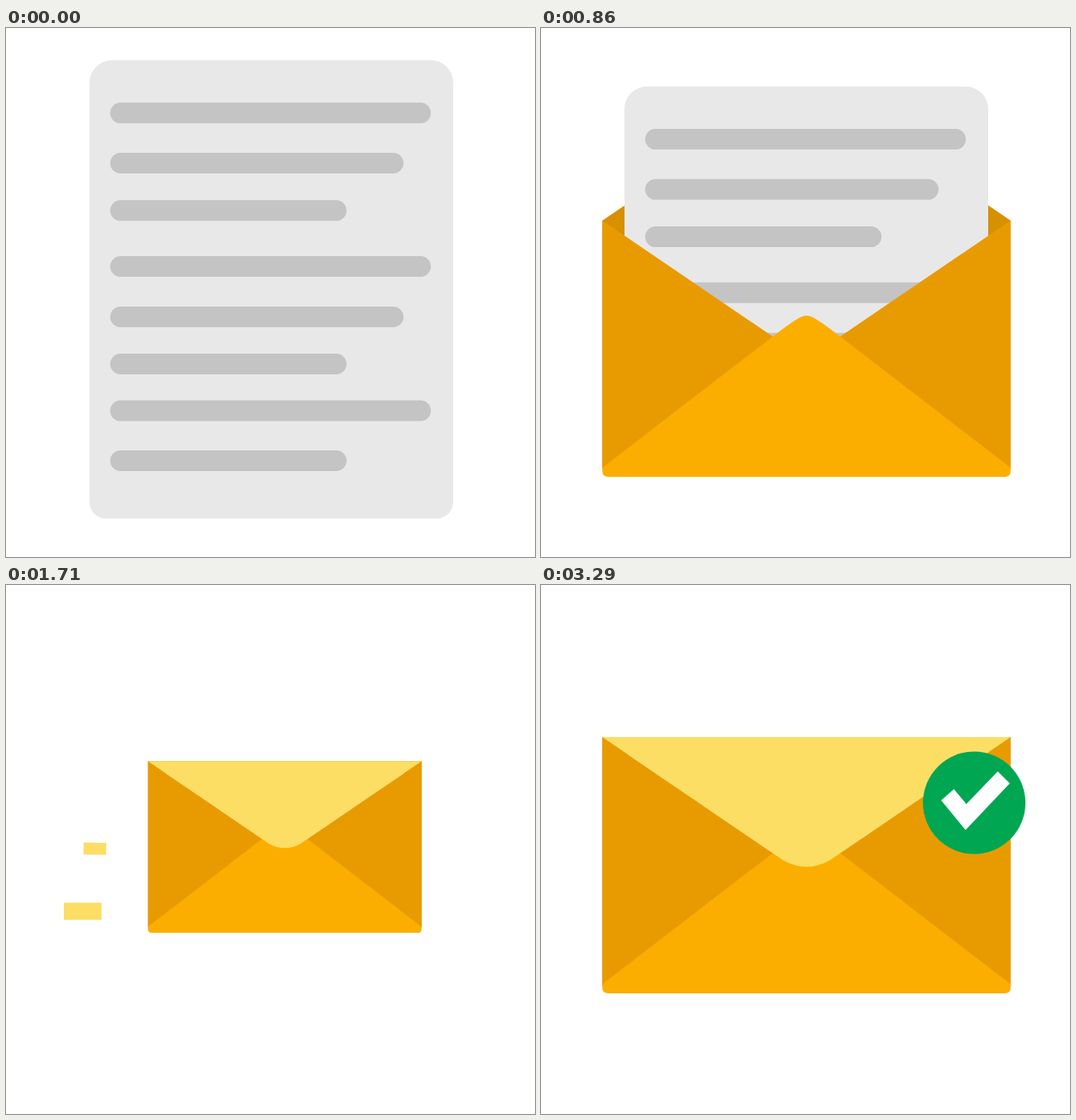
An HTML page for the animation above (3.5 s loop, 640 by 640 pixels).

```html
<!DOCTYPE html>
<html lang="en">
<head>
<meta charset="utf-8">
<title>Sending a letter</title>
<style>
  html, body { margin: 0; width: 100%; height: 100%; overflow: hidden; background: #fff; }
  svg { display: block; width: 100vw; height: 100vh; }
</style>
</head>
<body>
<svg viewBox="0 0 640 640">
  <defs>
    <path id="flap" d="M-247 0 L-29 148.5 C-20 154 -9 157 0 157 C9 157 20 154 29 148.5 L247 0Z"/>
    <clipPath id="pocket"><rect x="-400" y="-1200" width="800" height="1350"/></clipPath>
  </defs>

  <g id="dashes" fill="#fcde65"></g>

  <!-- envelope, drawn around its own centre -->
  <g id="envelope">
    <use id="flapBack" href="#flap" fill="#d69000"/>
    <rect x="-247" y="-155" width="494" height="300" fill="#d69000"/>
    <g clip-path="url(#pocket)">
      <g id="letter">
        <path fill="#e8e8e8" d="M101 66 A27 27 0 0 1 128 39 H514 A27 27 0 0 1 541 66 V573.500 A20 20 0 0 1 521 593.500 H121 A20 20 0 0 1 101 573.500Z"/>
        <g id="lines" fill="#c4c4c4"></g>
      </g>
    </g>
    <path fill="#e89b00" d="M-247 -155 L0 13 L247 -155 V146 H-247Z"/>
    <path fill="#fbae00" d="M-247 144 L-28 -24.500 C-14 -34.500 -6 -40 0 -40 C6 -40 14 -34.500 28 -24.500 L247 144 V148 Q247 155 240 155 H-240 Q-247 155 -247 148Z"/>
    <use id="flapFront" href="#flap" fill="#fcde65"/>
  </g>

  <g id="badge">
    <circle r="62" fill="#00a651"/>
    <path fill="#fff" d="M-40 -3 L-24.500 -16.500 L-9.500 1.500 L28.500 -38 L43 -23.500 L-10.500 33Z"/>
  </g>
</svg>

<script>
const LOOP = 3500, FPS = 14, SPAN = 7; // every tween takes SPAN ticks (half a second)
const CX = 321.2, OPEN_Y = 388;
const $ = id => document.getElementById(id);
const place = (el, value) => el.setAttribute('transform', value);

function addRect(parent, attrs) {
  const el = document.createElementNS('http://www.w3.org/2000/svg', 'rect');
  for (const key in attrs) el.setAttribute(key, attrs[key]);
  return parent.appendChild(el);
}

const widths = { long: 388, mid: 355, short: 286 };
[[90.3, 'long'], [151, 'mid'], [208.3, 'short'], [276, 'long'],
 [337, 'mid'], [394, 'short'], [450.6, 'long'], [511, 'short']].forEach(([y, size]) =>
  addRect($('lines'), { x: 126, y, width: widths[size], height: 25, rx: 12.5 }));

// centre, width, tilt and first tick of each speed mark
const dashes = [
  { x: 140.2, y: 236, w: 23.5, tilt: 0, start: 24 },
  { x: 107.5, y: 319, w: 37, tilt: 0.9, start: 22.5 },
  { x: 92.8, y: 394.7, w: 43.5, tilt: 0, start: 21 }
];
for (const d of dashes)
  d.el = addRect($('dashes'), { x: -d.w / 2, y: -9.8, width: d.w, height: 19.6 });

const inOut = t => t < 0.5 ? 4 * t ** 3 : 1 - 4 * (1 - t) ** 3;
const backOut = t => 1 + 2.70158 * (t - 1) ** 3 + 1.70158 * (t - 1) ** 2;
const tween = (tick, start, ease = inOut) =>
  ease(Math.min(1, Math.max(0, (tick - start) / SPAN)));

function draw(tick) {
  const below = 569 * (1 - tween(tick, 3.4));
  const drop = 205 * tween(tick, 9.63);
  const turn = -Math.cos(Math.PI * tween(tick, 13.9));
  const shrink = tween(tick, 14), shift = tween(tick, 21), grow = tween(tick, 32);

  const x = CX + 51 * (shift - grow);
  const y = OPEN_Y + below - 71 * shrink + 22 * grow;
  const size = 1 - 0.33 * (shrink - grow);
  place($('envelope'), `translate(${x} ${y}) scale(${size})`);
  place($('letter'), `translate(${-CX} ${drop - below - OPEN_Y})`);
  place($('flapBack'), `translate(0 -155) scale(1 ${Math.min(0, turn)})`);
  place($('flapFront'), `translate(0 -155) scale(1 ${Math.max(0, turn)})`);

  for (const d of dashes) {
    const s = tween(tick, d.start, backOut) * (1 - grow);
    place(d.el, `translate(${d.x} ${d.y}) rotate(${d.tilt}) scale(${s})`);
  }
  place($('badge'), `translate(524.1 263.5) scale(${tween(tick, 39, backOut)})`);
}

function loop() {
  const ms = performance.now() % LOOP;
  draw(Math.floor((ms + 4.5) * FPS / 1000) % (LOOP * FPS / 1000));
  requestAnimationFrame(loop);
}
loop();
</script>
</body>
</html>
```
